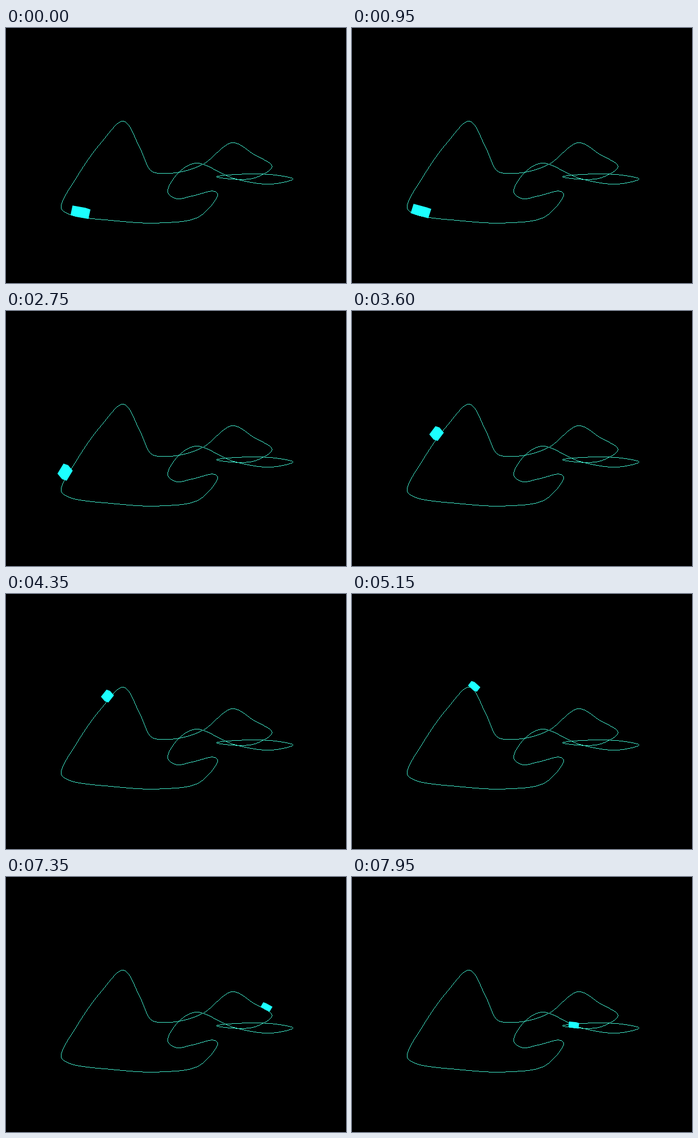
These frames come from a looping animation (600 px wide and 450 px high, 8 s). An HTML page with a canvas:

```html
<!DOCTYPE html>
<html lang="en">
<head>
<meta charset="utf-8">
<title>Coaster ride</title>
<style>
  html, body { margin: 0; width: 100%; height: 100%; overflow: hidden; background: #000; }
  canvas { display: block; }
</style>
</head>
<body>
<canvas id="stage" width="600" height="450"></canvas>
<script>
const ctx = document.getElementById('stage').getContext('2d');
const LOOP = 8000, STEP = 50;

// Key points of the closed track, in riding order.
const track = [
  [270, 343.5], [190, 339.5], [112, 328.5], [97, 317], [126, 260], [168, 201],
  [207, 164], [236, 212], [254, 250], [266, 255.5], [305, 254], [348, 239.5],
  [399, 202], [436, 222], [469, 244], [440, 263.5], [405, 266.5], [371, 262],
  [415, 257.5], [475, 259], [506, 266], [465, 275], [400, 264.5], [335, 238],
  [303, 256], [285, 289], [300, 300.5], [330, 295.5], [366, 287.5], [373, 293],
  [340, 332.5]
];

// Time in ms and position along the track, counted in key points.
const ride = [
  [0, 1.72], [1850, 2.1], [2550, 3.25], [3600, 4.65], [5150, 6.15],
  [5950, 7.6], [6150, 9], [7350, 13.5], [7650, 14.25], [7950, 16.35]
];

function hermite(a, b, ma, mb, k) {
  const k2 = k * k, k3 = k2 * k;
  return a * (2 * k3 - 3 * k2 + 1) + ma * (k3 - 2 * k2 + k)
       + b * (3 * k2 - 2 * k3) + mb * (k3 - k2);
}

// Centripetal Catmull-Rom curve through the key points.
function trackPoint(u) {
  const n = track.length, i = Math.floor(u);
  const [p0, p1, p2, p3] = [-1, 0, 1, 2].map(d => track[(i + d + n) % n]);
  const gap = (a, b) => Math.sqrt(Math.hypot(b[0] - a[0], b[1] - a[1]));
  const d0 = gap(p0, p1), d1 = gap(p1, p2), d2 = gap(p2, p3);
  const tangent = (a, b, c, da, db) =>
    d1 * ((b - a) / da - (c - a) / (da + db) + (c - b) / db);
  return [0, 1].map(c => hermite(p1[c], p2[c],
    tangent(p0[c], p1[c], p2[c], d0, d1),
    tangent(p1[c], p2[c], p3[c], d1, d2), u - i));
}

// Monotone interpolation, so the car never rolls back.
function ridePosition(t) {
  const last = ride.length - 1;
  const slope = i => (ride[i + 1][1] - ride[i][1]) / (ride[i + 1][0] - ride[i][0]);
  const speed = i => {
    const a = slope(Math.max(i - 1, 0)), b = slope(Math.min(i, last - 1));
    return 2 * a * b / (a + b);
  };
  let i = 0;
  while (i < last - 1 && t >= ride[i + 1][0]) i++;
  const [t0, u0] = ride[i], [t1, u1] = ride[i + 1], span = t1 - t0;
  return hermite(u0, u1, speed(i) * span, speed(i + 1) * span, (t - t0) / span);
}

// Unsmoothed line: a new pixel each time the curve is one pixel further on.
function pixelTrack() {
  const path = new Path2D(), samples = 300;
  let px = -1, py = -1;
  for (let s = 0; s < track.length * samples; s++) {
    const [x, y] = trackPoint(s / samples);
    if (Math.max(Math.abs(x - px), Math.abs(y - py)) < 1) continue;
    [px, py] = [Math.round(x), Math.round(y)];
    path.rect(px, py, 1, 1);
  }
  return path;
}

// The car is a box standing on the track; it shrinks as it rides away.
function drawCar(t) {
  const u = ridePosition(t);
  const [x, y] = trackPoint(u), [nextX, nextY] = trackPoint(u + 0.01);
  const length = Math.hypot(nextX - x, nextY - y);
  const tx = (nextX - x) / length, ty = (nextY - y) / length;
  const away = Math.min(Math.max((t - 1200) / 4950, 0), 1);
  const scale = 0.78 + 0.22 * Math.cos(Math.PI * away);

  const up = [1.2 * tx * ty, -(1 + tx * tx) / 2].map(v => v * 17 * scale);
  const forward = [tx, ty].map(v => v * 23 * scale);
  const side = [9 * scale, 3 * scale];

  // Outline of a box in parallel projection: its edges in order of angle, there and back.
  const edges = [up, forward, side]
    .map(([ex, ey]) => ey < 0 ? [-ex, -ey] : [ex, ey])
    .sort((a, b) => Math.atan2(a[1], a[0]) - Math.atan2(b[1], b[0]));
  let cx = x + 0.5 + up[0] / 2, cy = y + 0.5 + up[1] / 2;
  for (const [ex, ey] of edges) { cx -= ex / 2; cy -= ey / 2; }
  ctx.beginPath();
  for (const sign of [1, -1]) {
    for (const [ex, ey] of edges) ctx.lineTo(cx += sign * ex, cy += sign * ey);
  }
  ctx.fillStyle = '#1cffff';
  ctx.fill();
}

const line = pixelTrack();

function frame() {
  const t = Math.floor(performance.now() % LOOP / STEP) * STEP;
  ctx.clearRect(0, 0, 600, 450);
  ctx.fillStyle = '#40e8c8';
  ctx.fill(line);
  drawCar(t);
  requestAnimationFrame(frame);
}
frame();
</script>
</body>
</html>
```
